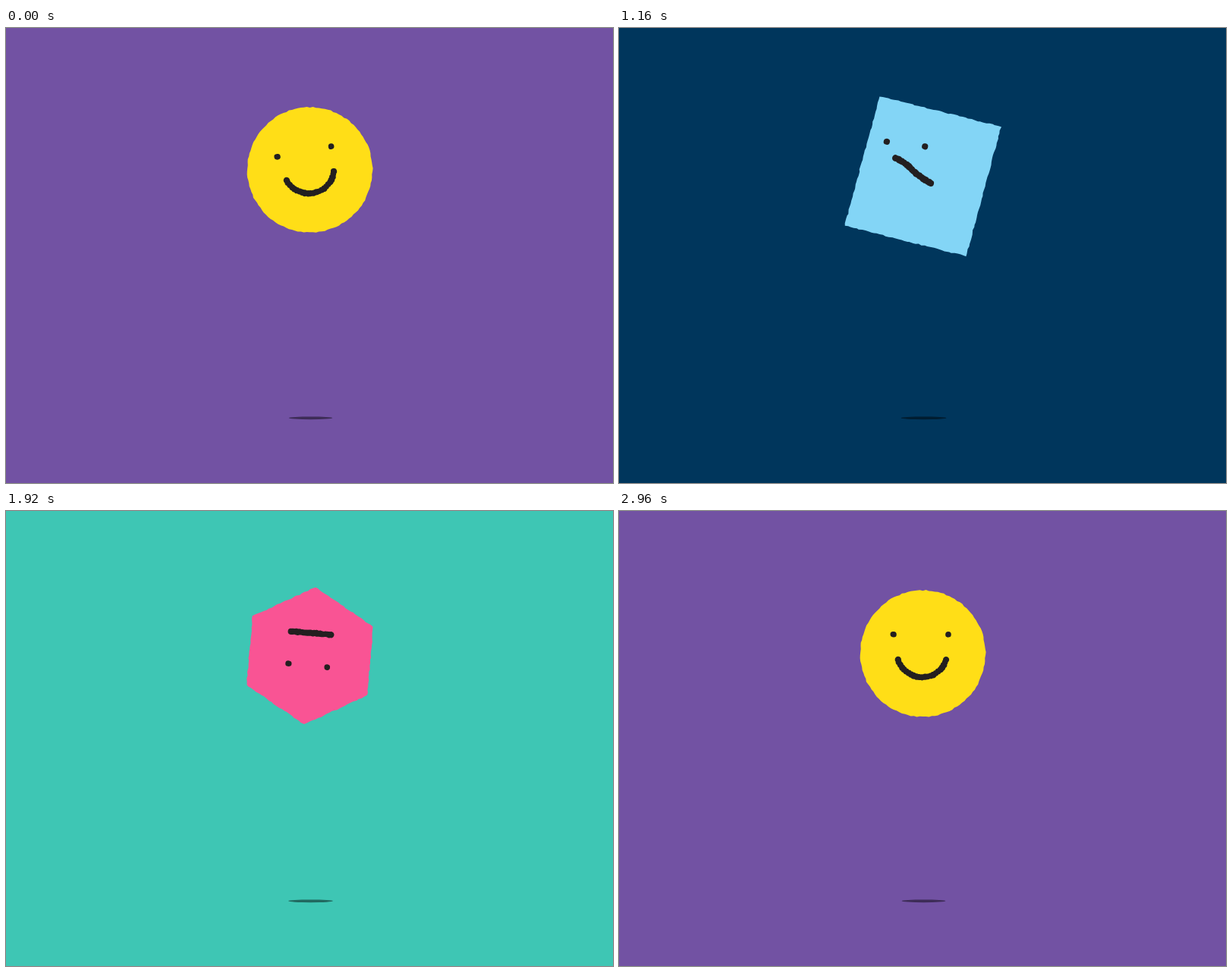
An HTML page with a canvas that plays this animation: 800x600 px, repeating every 3 s.

```html
<!DOCTYPE html>
<html lang="en">
<head>
<meta charset="utf-8">
<title>Bouncing shapes</title>
<style>
  html, body { margin: 0; width: 100%; height: 100%; overflow: hidden; background: #7252a3; }
  canvas { display: block; }
</style>
</head>
<body>
<canvas id="stage" width="800" height="600"></canvas>
<script>
const ctx = document.getElementById('stage').getContext('2d');
const LOOP = 3000, STEP = 40, FLOOR = 517.5, APEX = 187, CX = 400.5;
const INK = '#231f20';

function seeded(seed) {
  return () => {
    seed = (seed * 16807) % 2147483647;
    return seed / 2147483647;
  };
}

// Subdivides a closed polygon and jitters it into a torn-paper edge.
function roughEdge(corners, seed, amount) {
  const rnd = seeded(seed), path = new Path2D();
  corners.forEach(([x0, y0], i) => {
    const [x1, y1] = corners[(i + 1) % corners.length];
    const len = Math.hypot(x1 - x0, y1 - y0);
    const n = Math.max(1, Math.round(len / 4));
    for (let j = 0; j < n; j++) {
      const off = (rnd() - 0.5) * 2 * amount;
      const u = (j + (j ? (rnd() - 0.5) * 0.6 : 0)) / n;
      path.lineTo(x0 + (x1 - x0) * u + (y1 - y0) / len * off,
                  y0 + (y1 - y0) * u - (x1 - x0) / len * off);
    }
  });
  path.closePath();
  return path;
}

function ring(n, rx, ry) {
  return Array.from({ length: n }, (_, i) => {
    const a = i / n * 2 * Math.PI - Math.PI / 2;
    return [rx * Math.cos(a), ry * Math.sin(a)];
  });
}

function dot(path, x, y, r) {
  path.moveTo(x + r, y);
  path.arc(x, y, r, 0, 2 * Math.PI);
}

// A face is two blots and a line of overlapping brush dabs.
function makeFace(eyes, curve, seed) {
  const rnd = seeded(seed), path = new Path2D();
  for (const [x, y] of eyes) {
    dot(path, x, y, 3.8);
    dot(path, x + rnd() * 2 - 1, y + rnd() * 2 - 1, 3.5);
  }
  const n = 22;
  for (let i = 0; i <= n; i++) {
    const [x, y] = curve(i / n);
    dot(path, x + (rnd() - 0.5) * 0.8, y + (rnd() - 0.5) * 0.8, 3.7 + rnd() * 0.8);
  }
  return path;
}

const smile = u => {
  const a = Math.PI * (0.897 - 0.794 * u);
  return [-1 + 33.7 * Math.cos(a), -2.7 + 33.7 * Math.sin(a)];
};
const smirk = u => [-41 + 54 * u, -13.5 + 19.5 * (u - 0.06 * Math.sin(2 * Math.PI * u))];
const flat = u => [-25 + 53 * u, 30];

const shapes = [
  {
    bg: '#00365c', fill: '#83d5f6', squash: 0.78, drop: 1.7,
    body: roughEdge([[-81.1, -82.8], [83.9, -82.8], [81.1, 82.8], [-83.9, 82.8]], 71, 0.7),
    face: makeFace([[-57, -30.5], [-6.7, -36.2]], smirk, 12),
    reach: a => 82.5 * (Math.abs(Math.cos(a)) + Math.abs(Math.sin(a)))
  },
  {
    bg: '#3ec6b4', fill: '#f95494', squash: 0.8, drop: 0,
    body: roughEdge(ring(6, 92.2, 90.5), 29, 0.7),
    face: makeFace([[27.5, -12.5], [-24, -13]], flat, 34),
    reach: () => 90.5
  },
  {
    bg: '#7252a3', fill: '#ffde17', squash: 0.855, drop: 0, round: true,
    body: roughEdge(ring(130, 82.6, 82.6), 53, 0.65),
    face: makeFace([[-38.5, -25], [33.5, -25]], smile, 56),
    reach: () => 82.5
  }
];

// [time, degrees], running from one landing through all three shapes
const turns = [
  [500, -77], [920, -5], [1160, 14.2], [1480, 2.6], [1500, 2], [1920, 185],
  [2400, 180], [2500, 180], [2960, 0], [3000, -11], [3480, -76.5], [3500, -77]
];

function slope(keys, i) {
  if (i <= 0 || i >= keys.length - 1) return 0;
  const s = j => (keys[j + 1][1] - keys[j][1]) / (keys[j + 1][0] - keys[j][0]);
  const a = s(i - 1), b = s(i);
  return a * b <= 0 ? 0 : 2 * a * b / (a + b);
}

// Smooth curve through keys that never overshoots them
function track(keys, t) {
  let i = 0;
  while (i < keys.length - 2 && t >= keys[i + 1][0]) i++;
  const [t0, v0] = keys[i], [t1, v1] = keys[i + 1];
  const h = t1 - t0, u = (t - t0) / h, w = 1 - u;
  return v0 * w * w * (1 + 2 * u) + v1 * u * u * (3 - 2 * u)
    + h * u * w * (slope(keys, i) * w - slope(keys, i + 1) * u);
}

function stretch(p, squash) {
  return track([
    [0, 1], [160, 1.068], [400, 1.095], [450, 1.1], [480, squash], [500, squash - 0.03],
    [520, squash], [550, 1.09], [800, 1.05], [920, 1.005], [960, 1.01], [1000, 1]
  ], p);
}

function height(p) {
  if (p < 500) {
    const x = p / 480;
    return APEX + 50 * x ** 2 + 209 * x ** 4.72;
  }
  const x = (1000 - p) / 460;
  return APEX + 130 * x ** 2 + 135 * x ** 5;
}

function draw(t) {
  const time = t < 500 ? t + LOOP : t;
  const index = Math.floor((time - 500) / 1000);
  const shape = shapes[index];
  const p = t % 1000;
  const angle = track(turns, time) * Math.PI / 180;
  const sy = stretch(p, shape.squash);
  // The square leans with its stretch while it falls.
  const leaning = index === 0 && time >= 960;

  let half = shape.reach(angle) * sy;
  if (leaning) half = 82.5 * (sy * Math.cos(angle) + Math.abs(Math.sin(angle)));
  const grounded = p >= 470 && p <= 530;
  const cy = grounded ? FLOOR - half : Math.min(height(p), FLOOR - half);

  ctx.setTransform(1, 0, 0, 1, 0, 0);
  ctx.fillStyle = shape.bg;
  ctx.fillRect(0, 0, 800, 600);

  const rx = 28.8 + 0.165 * (cy - APEX);
  ctx.fillStyle = 'rgba(0, 0, 0, 0.47)';
  ctx.beginPath();
  ctx.ellipse(401.5, 514.3, rx, rx * 0.064, 0, 0, 2 * Math.PI);
  ctx.fill();

  ctx.translate(CX, cy + shape.drop);
  if (leaning) ctx.rotate(angle);
  ctx.scale(1, sy);
  if (!leaning && !shape.round) ctx.rotate(angle);
  ctx.fillStyle = shape.fill;
  ctx.fill(shape.body);
  if (shape.round) ctx.rotate(angle);
  ctx.fillStyle = INK;
  ctx.fill(shape.face);
}

const start = performance.now();
function tick() {
  const t = (performance.now() - start) % LOOP;
  draw(Math.floor(t / STEP) * STEP);
  requestAnimationFrame(tick);
}
tick();
</script>
</body>
</html>
```
